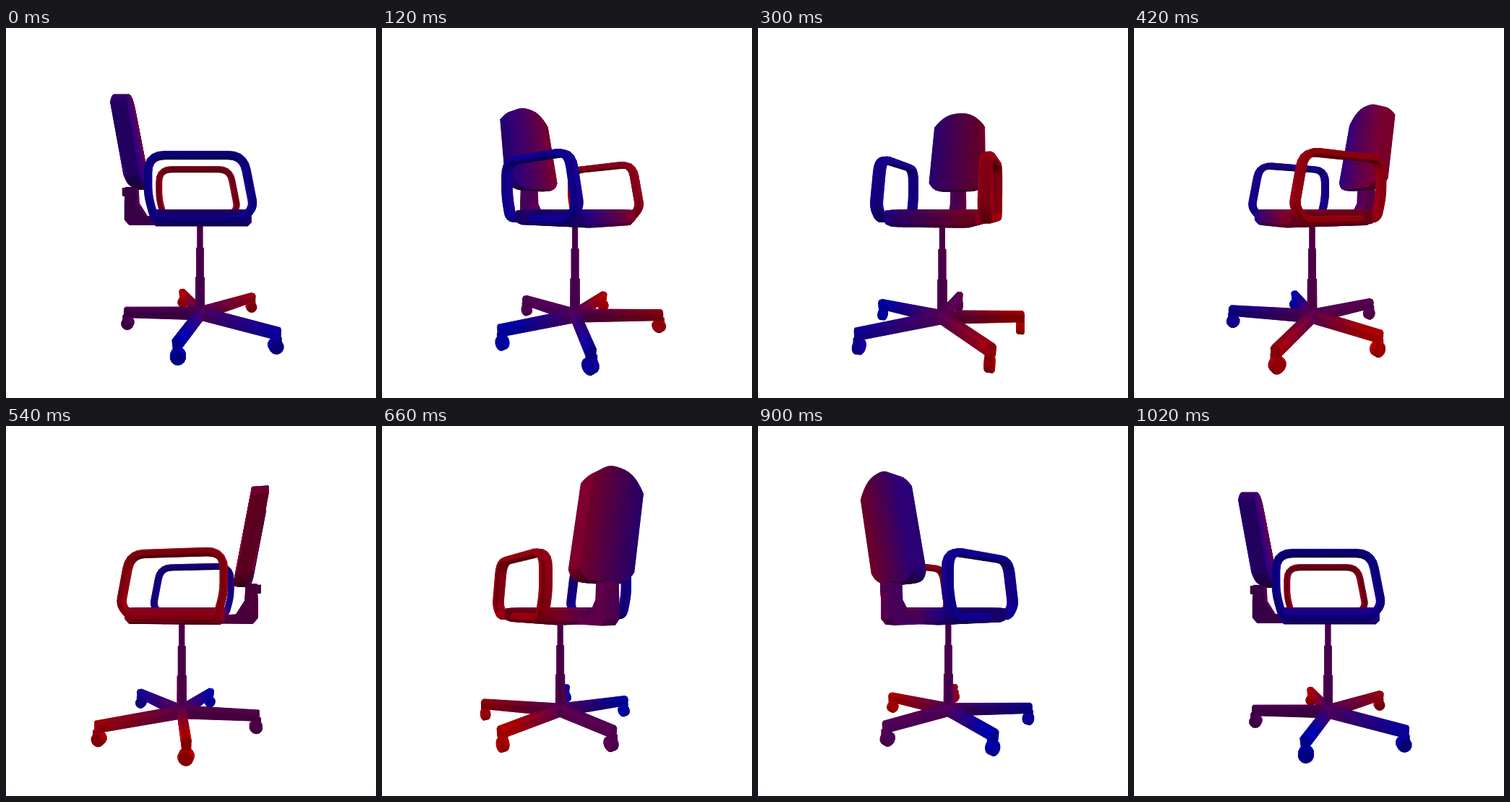
An HTML page with a canvas that plays this animation: 512 by 512 pixels, repeating every 1.08 s.

```html
<!DOCTYPE html>
<html lang="en">
<head>
<meta charset="utf-8">
<title>Turning office chair</title>
<style>
  html, body { margin: 0; width: 100%; height: 100%; overflow: hidden; background: #fff; }
  canvas { display: block; width: 512px; height: 512px; }
</style>
</head>
<body>
<canvas id="stage" width="512" height="512"></canvas>
<script>
// Chair space: [forward, up, right], origin on the seat top at the turning axis.
const ctx = document.getElementById('stage').getContext('2d');
const STEP = 60, STEPS = 18;
const CAMERA = 443, CENTER_X = 256, HORIZON = 252;
const MID = -2.5;
const faces = [];

const range = n => Array.from({ length: n }, (_, i) => i);
const mix = (a, b, t) => a + (b - a) * t;
const clamp = (v, lo, hi) => Math.min(hi, Math.max(lo, v));

// Skins neighbouring rings of points with quads and caps open ends.
function loft(rings, closed = false) {
  const n = rings[0].length;
  rings.forEach((ring, i) => {
    if (!closed && i === rings.length - 1) return;
    const next = rings[(i + 1) % rings.length];
    for (let j = 0; j < n; j++) {
      const k = (j + 1) % n;
      faces.push([ring[j], ring[k], next[k], next[j]]);
    }
  });
  if (!closed) faces.push(rings[0], rings[rings.length - 1]);
}

const circle = (n, place) => range(n).map(i => {
  const a = (i + 0.5) / n * 2 * Math.PI;
  return place(Math.cos(a), Math.sin(a));
});

function box(x0, x1, y0, y1, r0, r1) {
  loft([r0, r1].map(r => [[x0, y0, r], [x1, y0, r], [x1, y1, r], [x0, y1, r]]));
}

function buildSeat() {
  loft(range(15).map(i => {
    const u = i / 7 - 1;
    const r = MID + 55.5 * u;
    const edge = Math.abs(u) ** 12;
    const top = -edge, bottom = -20 + 3 * edge;
    const front = 75 - 2 * edge, rear = -48 + 2 * edge;
    const upper = range(6).map(k => [mix(rear + 2, front - 3, k / 5), top, r]);
    const lower = range(6).map(k => [mix(front - 4, rear + 4, k / 5), bottom, r]);
    return [...upper, [front, top - 4, r], [front, bottom + 4, r],
      ...lower, [rear, bottom + 4, r], [rear, top - 3, r]];
  }));
}

function buildBackrest() {
  loft(range(19).map(i => {
    const u = Math.sin((i / 9 - 1) * Math.PI / 2);
    const top = 157 - 20 * Math.abs(u) ** 2.6;
    const bottom = 30 + 13 * u ** 6;
    const at = (y, depth) =>
      [-73 - 0.19 * y - 3 * u * u + depth, y, MID + u * (45.5 - 0.04 * y)];
    const rear = range(7).map(k => at(mix(bottom + 2, top, k / 6), 0));
    const front = range(7).map(k => at(mix(top, bottom + 1, k / 6), 20));
    return [...rear, ...front, at(bottom, 15), at(bottom, 4)];
  }));
  const bracket = [[-89, 31], [-75, 31], [-74, 10], [-62, -9], [-42, -10],
    [-42, -20], [-84, -20], [-90, -13], [-90, 10]];
  loft(range(4).map(i => bracket.map(([x, y]) => [x, y, MID + mix(-11, 11, i / 3)])));
  box(-94, -89, 20, 30, MID - 6, MID + 6);
}

function roundedLoop(corners) {
  const path = [];
  const toward = (a, b, dist) => {
    const len = Math.hypot(b[0] - a[0], b[1] - a[1]);
    return [mix(a[0], b[0], dist / len), mix(a[1], b[1], dist / len)];
  };
  corners.forEach((c, i) => {
    const n = corners.length;
    const prev = corners[(i + n - 1) % n], next = corners[(i + 1) % n];
    const a = toward(c, prev, c[2]), b = toward(c, next, c[2]);
    for (let k = 0; k <= 5; k++) {
      const t = k / 5;
      path.push([0, 1].map(m => mix(mix(a[m], c[m], t), mix(c[m], b[m], t), t)));
    }
    const end = toward(next, c, next[2]);
    for (let k = 1; k < 5; k++) path.push([0, 1].map(m => mix(b[m], end[m], k / 5)));
  });
  return path;
}

function buildArm(side) {
  const path = roundedLoop([[-51, 65, 20], [62, 65, 18], [74, 4, 8],
    [61, -11, 6], [-43, -11, 8], [-51, 18, 12]]);
  const n = path.length;
  const boxy = v => Math.sign(v) * Math.abs(v) ** 0.6;
  loft(path.map(([x, y], i) => {
    const [px, py] = path[(i + n - 1) % n], [nx, ny] = path[(i + 1) % n];
    const len = Math.hypot(nx - px, ny - py) || 1;
    const ox = -(ny - py) / len, oy = (nx - px) / len;
    return circle(8, (c, s) => {
      const a = 4.3 * boxy(c), b = 7.4 * boxy(s);
      return [x + ox * a, y + oy * a, MID + side * 66 + b];
    });
  }), true);
}

function buildBase() {
  const column = [[-18, 3.6], [-53, 3.6], [-53, 5], [-94, 5], [-94, 6.2], [-120, 6.3], [-149, 6.6]];
  loft(column.map(([y, rad]) => circle(10, (c, s) => [12.5 + rad * c, y, MID + rad * s])));

  [[-101, 0], [-27, 101], [-27, -101], [85, 75], [85, -75]].forEach(([dx, dr]) => {
    const reach = Math.hypot(dx, dr);
    const ux = dx / reach, ur = dr / reach;
    loft(range(8).map(i => {
      const t = i / 7, along = t * (reach + 4);
      const half = mix(6, 5.3, t), top = -136, bottom = mix(-151, -148, t);
      const at = (w, y) => [13 + ux * along - ur * w, y, MID + ur * along + ux * w];
      return [at(-half + 2, top), at(half - 2, top), at(half, top - 3),
        at(half - 1, bottom), at(-half + 1, bottom), at(-half, top - 3)];
    }));
    const wx = 13 + dx, wr = MID + dr;
    box(wx - 4 + ux * 2, wx + 4 + ux * 2, -157, -146, wr - 4, wr + 4);
    loft([[-4.8, 7], [-3.5, 8.2], [3.5, 8.2], [4.8, 7]].map(([w, rad]) =>
      circle(14, (c, s) => [wx + rad * c, -157 + rad * s, wr + w])));
  });
}

function shade(points, lateral) {
  const [a, b, c, d] = points;
  const u = [0, 1, 2].map(i => c[i] - a[i]), v = [0, 1, 2].map(i => d[i] - b[i]);
  let n = [u[1] * v[2] - u[2] * v[1], u[2] * v[0] - u[0] * v[2], u[0] * v[1] - u[1] * v[0]];
  const len = Math.hypot(...n) || 1;
  const facing = -n[0] * a[0] - n[1] * a[1] + n[2] * (CAMERA - a[2]);
  n = n.map(k => k / len * (facing < 0 ? -1 : 1));
  const light = 0.49 + 0.2 * Math.abs(n[0]) + 0.16 * n[1];
  const blue = clamp((lateral - MID) / 180 + 0.5, 0, 1);
  return `rgb(${Math.round(255 * light * (1 - blue))},0,${Math.round(255 * light * blue)})`;
}

function draw(angle) {
  const cos = Math.cos(angle), sin = Math.sin(angle);
  const scene = faces.map(face => {
    const points = face.map(([x, y, r]) => [x * cos - r * sin, y, x * sin + r * cos]);
    const mean = (list, i) => list.reduce((sum, p) => sum + p[i], 0) / list.length;
    return {
      points,
      far: Math.hypot(mean(points, 0), mean(points, 1), CAMERA - mean(points, 2)),
      color: shade(points, mean(face, 2))
    };
  }).sort((a, b) => b.far - a.far);

  ctx.fillStyle = '#fff';
  ctx.fillRect(0, 0, 512, 512);
  ctx.lineWidth = 0.7;
  ctx.lineJoin = 'round';
  for (const { points, color } of scene) {
    ctx.beginPath();
    for (const [x, y, z] of points) {
      const s = CAMERA / (CAMERA - z);
      ctx.lineTo(CENTER_X + x * s, HORIZON - y * s);
    }
    ctx.closePath();
    ctx.fillStyle = ctx.strokeStyle = color;
    ctx.fill();
    ctx.stroke();
  }
}

buildSeat();
buildBackrest();
buildArm(1);
buildArm(-1);
buildBase();

const start = performance.now();
let shown = -1;
function tick() {
  const step = Math.floor((performance.now() - start) / STEP) % STEPS;
  if (step !== shown) {
    shown = step;
    draw(step / (STEPS - 1) * 2 * Math.PI);
  }
  requestAnimationFrame(tick);
}
tick();
</script>
</body>
</html>
```
